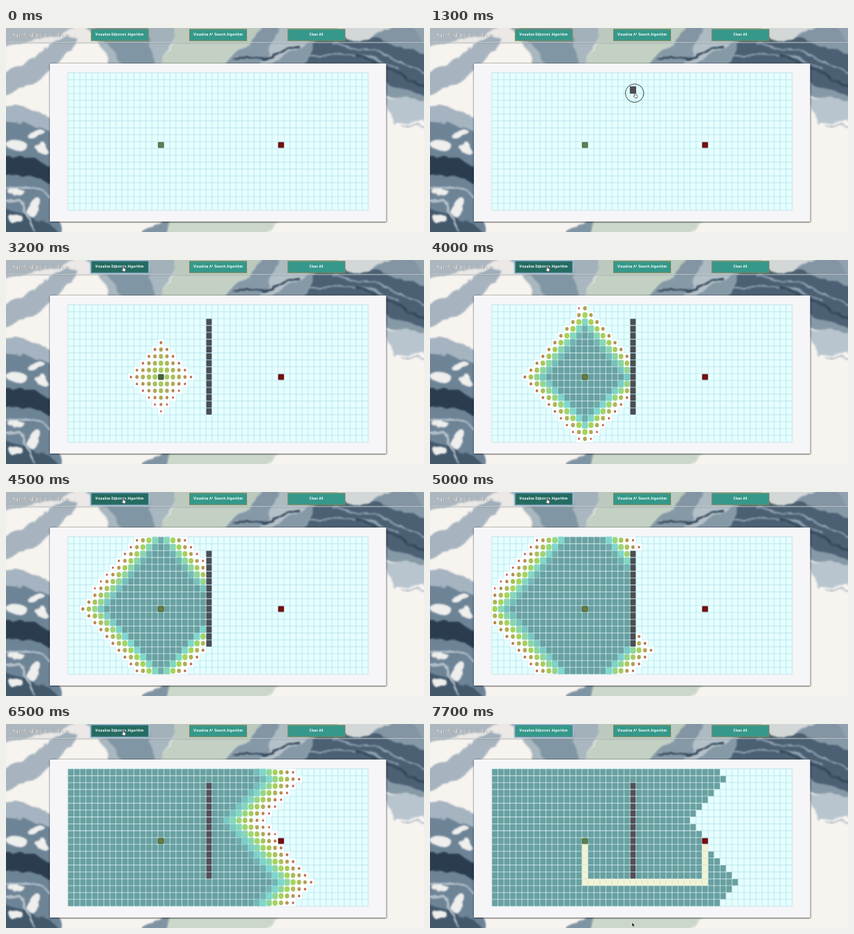
Animation of 600x293 px, one loop 7800 ms. Source, as an HTML page with a canvas:

```html
<!DOCTYPE html>
<html lang="en">
<head>
<meta charset="utf-8">
<title>Pathfinding Visualizer</title>
<style>
  html, body { margin: 0; width: 100%; height: 100%; overflow: hidden; background: #f7f3ef; }
  svg, canvas { position: absolute; left: 0; top: 0; width: 600px; height: 293px; }
  text { font-family: Roboto, "Open Sans", sans-serif; fill: #fff; }
  .title { font-size: 6.6px; font-weight: 500; letter-spacing: .79px; filter: drop-shadow(.6px .8px .5px #111d); }
  .btn text { font-size: 4.6px; font-weight: 700; letter-spacing: .3px; text-anchor: middle; }
  .btn .face { fill: #35988a; stroke: #7d8a58; stroke-width: 1; }
  .btn .halo { fill: none; stroke: #a9c4d6; stroke-width: 1.4; visibility: hidden; }
  .btn.focus .halo { visibility: visible; }
  .btn.focus .face { stroke: #5d8ba0; }
  .btn.hover .face { fill: #246b61; }
</style>
</head>
<body>
<svg viewBox="0 0 600 293">
  <defs>
    <filter id="marble" filterUnits="userSpaceOnUse" x="-40" y="-40" width="680" height="373" color-interpolation-filters="sRGB">
      <feTurbulence type="fractalNoise" baseFrequency=".035" numOctaves="3" seed="4"/>
      <feDisplacementMap in="SourceGraphic" scale="16" xChannelSelector="R" yChannelSelector="G"/>
      <feGaussianBlur stdDeviation="1.3"/>
    </filter>
    <filter id="drop" x="-5%" y="-5%" width="110%" height="110%"><feDropShadow dx=".3" dy=".5" stdDeviation="1.3" flood-color="#0a0e12"/></filter>
  </defs>

  <!-- marbled backdrop -->
  <rect width="600" height="293" fill="#f7f3ef"/>
  <g filter="url(#marble)">
    <path d="M-30 -30H125Q100 8 62 14T-30 34Z" fill="#b3bdc4"/>
    <path d="M-30 76Q20 62 50 34T108 14L92 34Q60 62 34 80T-30 100Z" fill="#a7b4bf"/>
    <path d="M84 -30H262Q235 14 222 60H148Q150 30 84 -30Z" fill="#a9b7c0"/>
    <path d="M96 -30H190Q215 22 212 60H176Q150 24 96 -30Z" fill="#8196a5"/>
    <path d="M236 -30H400Q350 20 340 60H215Q252 14 236 -30Z" fill="#c3d1c5"/>
    <path d="M385 -30H640V118Q575 112 546 92L500 60H298Q350 36 385 -30Z" fill="#8699a7"/>
    <path d="M395 -30H520Q490 10 450 20T355 60Q388 24 395 -30Z" fill="#b4c1c8"/>
    <path d="M450 20Q515 0 560 24T640 40V104Q580 96 546 78L505 60H425Z" fill="#4b6073"/>
    <path d="M482 -30H566Q552 14 506 16T482 -30Z" fill="#dde0df"/>
    <path d="M566 -30H640V36Q590 34 566 -30Z" fill="#96a6b2"/>
    <path d="M540 94Q580 108 640 106V134Q580 134 560 140Z" fill="#b9c5ce"/>
    <path d="M-30 116Q30 104 80 134V180Q30 176 -30 200Z" fill="#a5b4c0"/>
    <path d="M-30 140Q30 126 80 160V310H-30Z" fill="#6d8497"/>
    <path d="M-30 184Q24 180 80 206V228Q24 198 -30 212Z" fill="#2a3c4e"/>
    <path d="M-30 262Q40 244 98 320H-30Z" fill="#42596c"/>
    <path d="M176 320Q196 282 250 268H282Q246 286 232 320Z" fill="#8095a3"/>
    <path d="M240 268H398Q372 290 352 320H220Z" fill="#ccd7cc"/>
    <g fill="none" stroke-linecap="round">
      <path d="M430 44Q490 30 560 56M470 24Q540 30 600 66" stroke="#90a4b2" stroke-width="2.5"/>
      <path d="M500 40Q560 62 600 84M330 48Q380 40 420 26" stroke="#33485b" stroke-width="3"/>
      <path d="M568 142Q584 136 604 144" stroke="#aab8c3" stroke-width="1.5"/>
      <path d="M-10 236Q30 216 70 250M-10 250Q24 236 44 290" stroke="#b9c5cd" stroke-width="3"/>
    </g>
    <g fill="#eeeeec">
      <ellipse cx="16" cy="168" rx="16" ry="10"/><ellipse cx="44" cy="152" rx="11" ry="6"/>
      <ellipse cx="51" cy="174" rx="8" ry="7"/><ellipse cx="14" cy="236" rx="11" ry="6"/>
      <ellipse cx="40" cy="258" rx="8" ry="10"/><ellipse cx="14" cy="272" rx="9" ry="7"/>
    </g>
  </g>

  <rect width="600" height="20.5" fill="#56666f" fill-opacity=".08"/>
  <path d="M0 20.8H600" stroke="#c3cacd" stroke-opacity=".85" stroke-width="1.2"/>
  <path d="M0 22H600" stroke="#55636e" stroke-opacity=".25" stroke-width="1.2"/>
  <text class="title" x="9" y="12.6">Pathfinding Visualizer</text>
  <g id="run" class="btn">
    <rect class="halo" x="121" y=".8" width="84.6" height="18.4" rx="1"/>
    <rect class="face" x="122.3" y="1.8" width="82" height="16.4"/>
    <text x="163" y="11.4">Visualize Dijkstra's Algorithm</text>
  </g>
  <g class="btn">
    <rect class="face" x="263.5" y="1.8" width="82" height="16.4"/>
    <text x="304.5" y="11.4">Visualize A* Search Algorithm</text>
  </g>
  <g class="btn">
    <rect class="face" x="404.7" y="1.8" width="82" height="16.4"/>
    <text x="445.5" y="11.4">Clear All</text>
  </g>
  <rect x="63" y="51" width="482.5" height="227" fill="#f6f5f7" filter="url(#drop)"/>
</svg>
<canvas id="view"></canvas>
<script>
const LOOP = 7800, COLS = 50, ROWS = 20;
const X0 = 88.8, Y0 = 64.4, CW = 8.62, CH = 9.87;
const START = [15, 10], END = [35, 10];
const WALL = { col: 23, top: 2, bottom: 15 };
const GROW = 750, PATH_AT = 6515, PATH_STEP = 25;

const canvas = document.getElementById('view');
const runBtn = document.getElementById('run');
const g = canvas.getContext('2d');
const dpr = window.devicePixelRatio || 1;
canvas.width = 600 * dpr;
canvas.height = 293 * dpr;

const clamp = v => Math.max(0, Math.min(1, v));
const mix = (a, b, p) => a + (b - a) * p;
const mixRGB = (a, b, p) => `rgb(${a.map((v, i) => Math.round(mix(v, b[i], p)))})`;
const easeOut = p => 1 - (1 - p) ** 1.5;

// Linear lookup through [input, output...] rows
function track(rows, v) {
  let i = 1;
  while (i < rows.length - 1 && v > rows[i][0]) i++;
  const [a, ...from] = rows[i - 1], [b, ...to] = rows[i];
  const p = clamp((v - a) / (b - a));
  return from.map((f, k) => mix(f, to[k], p));
}

const isWall = (c, r) => c === WALL.col && r >= WALL.top && r <= WALL.bottom;

// Visited cells: by distance, then row by row, up to the goal
function search() {
  const dist = new Map([[START[1] * COLS + START[0], 0]]);
  const queue = [START];
  for (const [c, r] of queue) {
    const d = dist.get(r * COLS + c) + 1;
    for (const [x, y] of [[c, r - 1], [c, r + 1], [c - 1, r], [c + 1, r]]) {
      const key = y * COLS + x;
      if (x < 0 || y < 0 || x >= COLS || y >= ROWS || isWall(x, y) || dist.has(key)) continue;
      dist.set(key, d);
      queue.push([x, y]);
    }
  }
  const order = [...dist].sort((a, b) => a[1] - b[1] || a[0] - b[0]).map(e => e[0]);
  return order.slice(0, order.indexOf(END[1] * COLS + END[0]));
}

const PACE = [[0, 2895], [60, 3198], [211, 3998], [419, 4998], [728, 6500]];
const visited = search().map((key, i) => ({
  c: key % COLS, r: Math.floor(key / COLS), at: track(PACE, i)[0]
}));

const path = [];
for (let r = 10; r < 16; r++) path.push([15, r]);
for (let c = 15; c < 35; c++) path.push([c, 16]);
for (let r = 16; r > 10; r--) path.push([35, r]);

const wallAt = r => 1300 + (Y0 + CH * r - 93) / 124 * 800;

const RED = [200, 72, 72], GREEN = [166, 213, 91], AQUA = [125, 215, 207], TEAL = [105, 160, 161];

function block(c, r, scale, color, round = .8, gap = .8) {
  const w = (CW - gap) * scale, h = (CH - gap) * scale;
  g.fillStyle = color;
  g.beginPath();
  g.roundRect(X0 + (c + .5) * CW - w / 2, Y0 + (r + .5) * CH - h / 2, w, h, Math.min(round, w / 2));
  g.fill();
}

function drawGrid() {
  g.fillStyle = '#e5ffff';
  g.fillRect(X0, Y0, COLS * CW, ROWS * CH);
  g.lineWidth = .8;
  g.strokeStyle = '#b6dfe8';
  g.beginPath();
  for (let c = 0; c <= COLS; c++) {
    g.moveTo(X0 + c * CW, Y0);
    g.lineTo(X0 + c * CW, Y0 + ROWS * CH);
  }
  for (let r = 0; r <= ROWS; r++) {
    g.moveTo(X0, Y0 + r * CH);
    g.lineTo(X0 + COLS * CW, Y0 + r * CH);
  }
  g.stroke();
}

function drawVisited({ c, r, at }, t) {
  const p = clamp((t - at) / GROW);
  g.fillStyle = mixRGB([251, 254, 255], [202, 228, 230], clamp(p * 4 - 2));
  g.fillRect(X0 + c * CW, Y0 + r * CH, CW, CH);
  const scale = p < .75 ? mix(.3, 1.1, easeOut(p / .75)) : mix(1.1, 1, easeOut(p * 4 - 3));
  const color = p < .5 ? mixRGB(RED, GREEN, easeOut(p * 2))
    : p < .75 ? mixRGB(GREEN, AQUA, easeOut(p * 4 - 2))
    : mixRGB(AQUA, TEAL, easeOut(p * 4 - 3));
  block(c, r, scale, color, p < .5 ? 9 : mix(4.5, .8, clamp(p * 4 - 2)));
}

function drawWalls(t) {
  const color = mixRGB([75, 78, 82], [86, 78, 87], clamp((t - 5200) / 600));
  for (let r = WALL.top; r <= WALL.bottom; r++) {
    const age = t - wallAt(r);
    if (age >= 0) block(WALL.col, r, 1 + .16 * (1 - clamp((age - 60) / 140)), color);
  }
}

function drawEnd([c, r], color, edge) {
  const size = 7.6, x = X0 + (c + .5) * CW - size / 2, y = Y0 + (r + .5) * CH - size / 2;
  g.fillStyle = color;
  g.strokeStyle = edge;
  g.lineWidth = .8;
  g.beginPath();
  g.roundRect(x, y, size, size, .8);
  g.fill();
  g.stroke();
}

function drawEnds(t) {
  let color = '#56824f';
  if (t > 2895 && t < PATH_AT) color = mixRGB([62, 98, 64], [108, 122, 56], clamp((t - 3250) / 500));
  drawEnd(START, color, '#38532f');
  drawEnd(END, '#7b0b0b', '#4c0505');
}

const MOVES = [
  [350, 291, 300], [1000, 294, 93], [1300, 294, 93], [2100, 292, 217],
  [2250, 292, 217], [2700, 168, 9], [7250, 168, 9], [7600, 290, 285], [7800, 290, 285]
];
const ARROW = new Path2D('M0 0V6.2L1.5 4.9L2.5 7L3.4 6.6L2.5 4.5H4.4Z');
const HAND = new Path2D('M-.9 .8Q0 -.3 .7 .8L1.2 2.8L3.4 3.4Q4.2 3.8 3.9 5.2L3.3 7.4H.2L-2.2 4.9Q-2 3.9 -.4 4.6Z');

function drawCursor(t) {
  if (t < 350) return;
  const [x, y] = track(MOVES, t);
  if (t > 1240 && t < 2110) {
    g.strokeStyle = '#2a3135';
    g.lineWidth = .9;
    g.beginPath();
    g.arc(x - .3, y + .4, 13.2, 0, 7);
    g.stroke();
  }
  const onGrid = x > X0 && x < X0 + COLS * CW && y > Y0 && y < Y0 + ROWS * CH;
  const onButton = y < 18 && x > 122 && x < 204;
  const hand = onGrid || onButton;
  g.save();
  g.translate(x, y);
  g.fillStyle = hand ? '#fff' : '#111';
  g.strokeStyle = hand ? '#333' : '#fff';
  g.lineWidth = hand ? .7 : .5;
  g.fill(hand ? HAND : ARROW);
  g.stroke(hand ? HAND : ARROW);
  g.restore();
}

function draw(t) {
  g.setTransform(dpr, 0, 0, dpr, 0, 0);
  g.clearRect(0, 0, 600, 293);
  drawGrid();
  for (const cell of visited) if (t >= cell.at) drawVisited(cell, t);
  drawWalls(t);
  path.forEach(([c, r], i) => {
    const age = t - PATH_AT - i * PATH_STEP;
    if (age >= 0) block(c, r, mix(.6, 1, easeOut(clamp(age / 250))), '#f1f3d5', .8, .3);
  });
  drawEnds(t);
  drawCursor(t);
  runBtn.classList.toggle('hover', t > 2670 && t < 7270);
  runBtn.classList.toggle('focus', t > 2850);
}

const begin = performance.now();
function tick() {
  draw((performance.now() - begin) % LOOP);
  requestAnimationFrame(tick);
}
tick();
</script>
</body>
</html>
```
